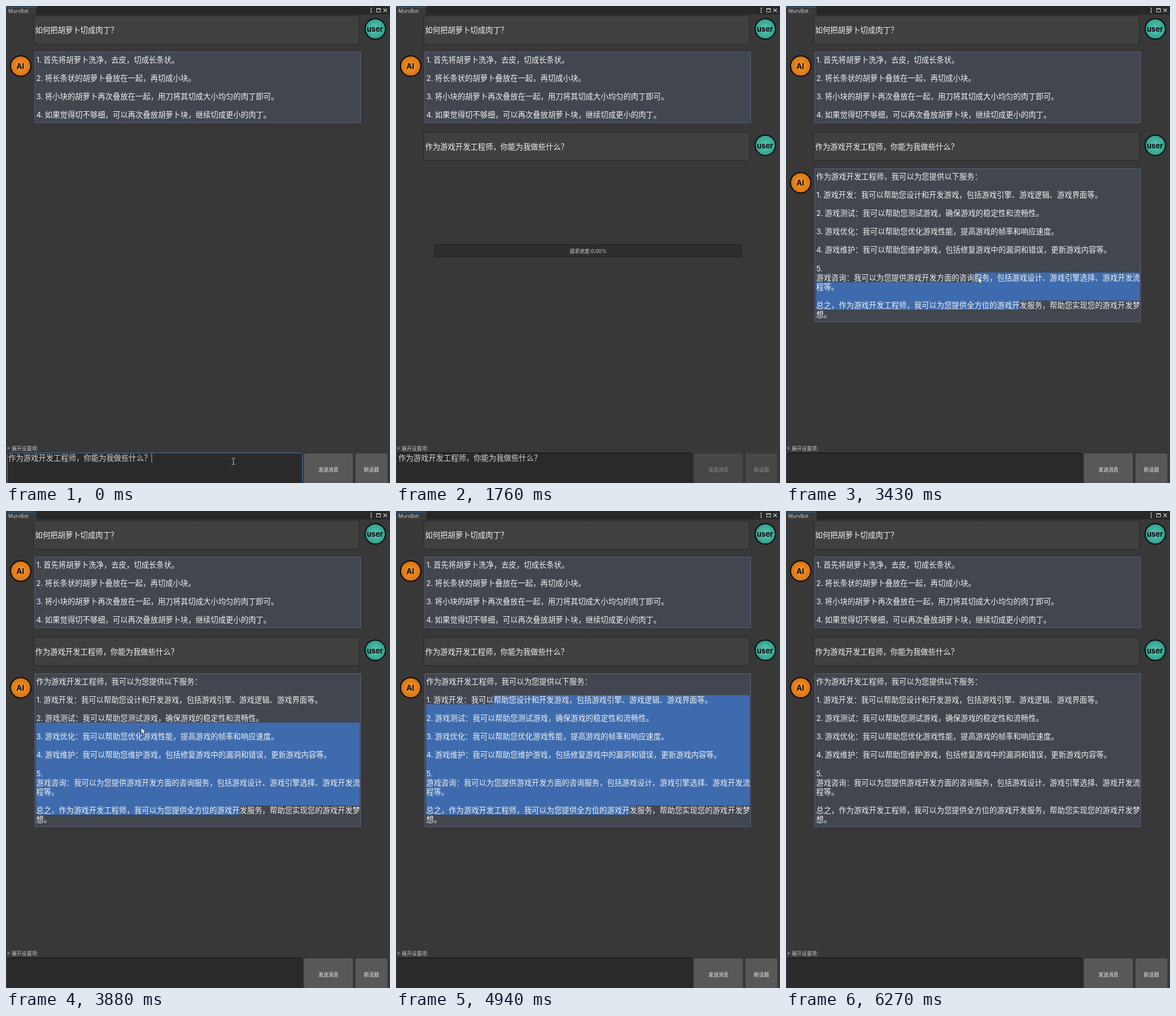
An HTML page with a canvas for the animation above (6830 ms loop, 672 by 834 pixels).

```html
<!DOCTYPE html>
<html lang="zh-CN">
<head>
<meta charset="utf-8">
<style>
html, body { margin: 0; width: 100%; height: 100%; overflow: hidden; background: #383838; }
canvas { display: block; }
</style>
</head>
<body>
<canvas id="stage" width="672" height="834"></canvas>
<script>
const g = document.getElementById('stage').getContext('2d');
const LOOP = 6830, SMALL = 8.8, BIG = 13.2, LINE = 16.07;
const LATIN = 'Inter, "Noto Sans CJK SC", "Noto Sans CJK", sans-serif';
const HAN = '"Noto Sans CJK SC", "Noto Sans CJK", Inter, sans-serif';

const RECIPE = [
  '1. 首先将胡萝卜洗净，去皮，切成长条状。', '',
  '2. 将长条状的胡萝卜叠放在一起，再切成小块。', '',
  '3. 将小块的胡萝卜再次叠放在一起，用刀将其切成大小均匀的肉丁即可。', '',
  '4. 如果觉得切不够细，可以再次叠放胡萝卜块，继续切成更小的肉丁。'
];
const SERVICES = [
  '作为游戏开发工程师，我可以为您提供以下服务：', '',
  '1. 游戏开发：我可以帮助您设计和开发游戏，包括游戏引擎、游戏逻辑、游戏界面等。', '',
  '2. 游戏测试：我可以帮助您测试游戏，确保游戏的稳定性和流畅性。', '',
  '3. 游戏优化：我可以帮助您优化游戏性能，提高游戏的帧率和响应速度。', '',
  '4. 游戏维护：我可以帮助您维护游戏，包括修复游戏中的漏洞和错误，更新游戏内容等。', '',
  '5.',
  '游戏咨询：我可以为您提供游戏开发方面的咨询服务，包括游戏设计、游戏引擎选择、游戏开发流',
  '程等。', '',
  '总之，作为游戏开发工程师，我可以为您提供全方位的游戏开发服务，帮助您实现您的游戏开发梦',
  '想。'
];
const QUESTION = '作为游戏开发工程师，你能为我做些什么？';

// Pointer keys: time, x, y, shape (beam is placed by its centre)
const POINTER = [
  [0, 398, 796, 'beam'], [550, 403.5, 795.5, 'beam'],
  [700, 523, 802, 'arrow'], [850, 553, 808, 'arrow'], [970, 563, 810, 'arrow'],
  [1640, 568, 816, 'arrow'], [1760, 0, 0, ''],
  [3430, 336, 473, 'arrow'], [3580, 305, 426, 'arrow'], [3730, 265, 394, 'arrow'],
  [3880, 236, 378, 'arrow'], [4030, 214, 362, 'arrow'], [4150, 196, 346, 'arrow'],
  [4270, 183, 334, 'arrow'], [4390, 177, 332, 'arrow'], [4540, 176, 331, 'arrow'],
  [4790, 175, 330, 'arrow'], [4940, 271, 390.5, 'faint'],
  [5210, 298, 412, 'faint'], [5330, 325, 440, 'faint'], [5450, 340.5, 456.5, 'faint'],
  [5880, 348.5, 469.5, 'faint'], [6030, 455, 640, 'arrow'],
  [6150, 566, 813, 'arrow'], [6270, 0, 0, '']
];

function text(s, x, y, { size = BIG, color = '#f2f2f2', font = HAN, align = 'left', weight = 400 } = {}) {
  g.font = `${weight} ${size}px ${font}`;
  g.textAlign = align;
  g.fillStyle = color;
  g.fillText(s, x, y);
}

function rect(x, y, w, h, fill) {
  g.fillStyle = fill;
  g.fillRect(x, y, w, h);
}

function box(x, y, w, h, fill, stroke, radius = 0) {
  g.beginPath();
  g.roundRect(x, y, w, h, radius);
  g.fillStyle = fill;
  g.fill();
  g.strokeStyle = stroke;
  g.lineWidth = 1;
  g.stroke();
}

function avatar(label, x, y, inner, outer) {
  const shade = g.createRadialGradient(x, y, 2, x, y, 18);
  shade.addColorStop(0, inner);
  shade.addColorStop(1, outer);
  g.beginPath();
  g.arc(x, y, 17.8, 0, 7);
  g.fillStyle = shade;
  g.fill();
  g.strokeStyle = '#0b0b0b';
  g.lineWidth = 2;
  g.stroke();
  text(label, x - .7, y + 5.2, { size: 13, color: '#0c0c0c', font: LATIN, align: 'center', weight: 700 });
}

function userMessage(s, top) {
  box(48.5, top, 570, 50, '#404040', '#242424', 3);
  text(s, 51, top + 30);
  avatar('user', 646.3, top + 23, '#5cc0ae', '#2ba28e');
}

// Horizontal start of the Chinese text after an item number
const bodyStart = s => /^\d\. /.test(s) ? (s[0] === '1' ? 65.5 : 68.1) : 52.7;

function aiMessage(lines, top, height, drawSelection) {
  box(50.5, top, 570, height, '#41464f', '#5a6482');
  if (drawSelection) drawSelection();
  lines.forEach((s, i) => {
    const [, number, body] = s.match(/^(\d\.)? ?(.*)$/), y = top + 18.3 + i * LINE;
    if (number) text(number, 53, y, { font: LATIN });
    text(body, bodyStart(s), y);
  });
  avatar('AI', 25.7, top + 24.5, '#ee9136', '#d8740a');
}

function selection(px, py) {
  const top = 289.7, end = 14, row = Math.floor((py - top) / LINE);
  const line = SERVICES[row], start = bodyStart(line);
  const from = line ? start + Math.round((px - start) / BIG) * BIG : 52.7;
  for (let i = row; i <= end; i++) {
    const left = i === row ? from : 52.7, right = i === end ? 409 : 619;
    const y = Math.round(top + i * LINE);
    rect(left, y, right - left, Math.round(top + (i + 1) * LINE) - y, '#3e6bad');
  }
}

function progress(part) {
  box(67.5, 417.5, 537, 21, '#2e2e2e', '#1d1d1d');
  rect(68, 418, 536 * part, 20, '#21467f');
  text(`请求进度:${(part * 100).toFixed(2)}%`, 336, 431.6,
    { size: SMALL, color: '#d2d2d2', font: LATIN, align: 'center' });
}

function button(s, x, w, state) {
  const fill = { on: '#585858', down: '#46607c', off: '#474747' }[state];
  box(x + .5, 781.5, w - 1, 56, fill, '#303030', 3);
  text(s, x + w / 2, 814.2, { size: SMALL, color: state === 'off' ? '#8f8f8f' : '#eeeeee', align: 'center' });
}

function windowBar() {
  rect(0, 0, 672, 15, '#282828');
  rect(0, 1, 53, 14, '#3a3a3a');
  rect(0, 1, 53, 1.5, '#2c5d87');
  text('MurvBot', 4, 12.3, { size: SMALL, color: '#c8c8c8', font: LATIN });
  for (const y of [3, 6.5, 10]) rect(638, y, 2, 2, '#c4c4c4');
  g.strokeStyle = '#c4c4c4';
  g.lineWidth = 1;
  g.strokeRect(648.5, 4.5, 7, 6);
  rect(648, 4, 8, 2, '#c4c4c4');
  g.lineWidth = 1.3;
  g.stroke(new Path2D('M660.5 4.5l6 6m0-6l-6 6'));
}

function footer(t) {
  const focused = t < 1270, waiting = t >= 1390 && t < 3430;
  g.fillStyle = '#707070';
  g.fill(new Path2D('M2.5 769.5L8 773L2.5 776.5Z'));
  text('展开设置项:', 10, 776.6, { size: SMALL, color: '#c8c8c8' });
  box(2.5, 781.5, 516, 56, '#2a2a2a', focused ? '#3a79bb' : '#202020', 3);
  if (!focused) rect(4, 781, 513, 1, '#0e0e0e');
  if (t < 3430) text(QUESTION, 4, 795, { color: '#d2d2d2' });
  if (focused) rect(254.5, 782.5, 1, 15.5, '#b8b8b8');
  button('发送消息', 520.5, 87.5, waiting ? 'off' : t >= 1270 && t < 1390 ? 'down' : 'on');
  button('新话题', 610.5, 58, waiting ? 'off' : 'on');
}

function pointer(x, y, shape) {
  g.save();
  g.translate(x, y);
  g.lineWidth = 1;
  if (shape === 'arrow') {
    const p = new Path2D('M.5 .5V12L3.2 9.6L5 13.8L7 13L5.2 8.8H8.6Z');
    g.fillStyle = '#fff';
    g.fill(p);
    g.strokeStyle = '#111';
    g.lineWidth = .8;
    g.stroke(p);
  } else {
    g.globalAlpha = shape === 'faint' ? .4 : .85;
    g.strokeStyle = '#e0e0e0';
    g.stroke(new Path2D('M-3 -5.5H-1L0 -4.5L1 -5.5H3M0 -4.5V4.5M-3 5.5H-1L0 4.5L1 5.5H3'));
  }
  g.restore();
}

function draw(t) {
  const [, x, y, shape] = POINTER.findLast(key => key[0] <= t);
  rect(0, 0, 672, 834, '#383838');
  windowBar();
  userMessage('如何把胡萝卜切成肉丁？', 17);
  aiMessage(RECIPE, 80.5, 123.5);
  if (t >= 1390) userMessage(QUESTION, 220.5);
  if (t >= 1390 && t < 3430) progress(t < 3300 ? 0 : .5);
  if (t >= 3430) {
    // The selection follows the drag, then keeps its last extent until cleared
    const drag = t < 4940 ? [x, y] : [175, 330];
    aiMessage(SERVICES, 284.5, 267.5, t < 5090 && (() => selection(...drag)));
  }
  footer(t);
  if (shape) pointer(x, y, shape);
}

const begin = performance.now();
function tick() {
  draw((performance.now() - begin) % LOOP);
  requestAnimationFrame(tick);
}
tick();
</script>
</body>
</html>
```
